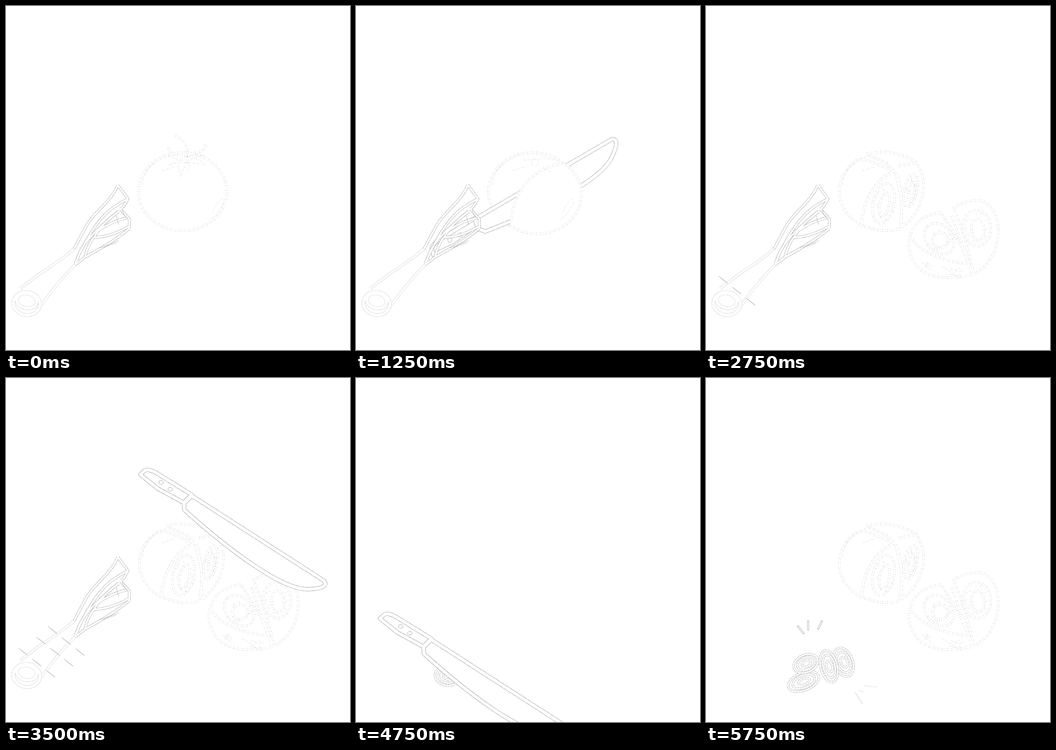
Animation of 748x748 px, one loop 6000 ms. Source, as an HTML page:

```html
<!DOCTYPE html>
<html lang="en">
<head>
<meta charset="utf-8">
<title>Slicing</title>
<style>
html, body { margin: 0; width: 100%; height: 100%; overflow: hidden; background: #fff; }
svg { display: block; width: 100vw; height: 100vh; }
path { fill: none; stroke-linejoin: round; }
.knife { stroke: #a8a8a8; stroke-dasharray: 11 .7; }
.leek { stroke: #acacac; stroke-dasharray: 4 1; }
.root { stroke: #c4c4c4; stroke-dasharray: 2 1.5; }
.tomato { stroke: #c4c4c4; stroke-dasharray: 2 3 1 4; }
.ring { stroke: #b8b8b8; stroke-dasharray: 5 1; }
.mark { stroke: #b8b8b8; stroke-linecap: round; }
.solid { fill: #fff; }
.core { stroke: #fff; }
</style>
</head>
<body>
<svg viewBox="0 0 748 748">
  <clipPath id="below"><path d="M0 480L60 515L200 600V748H0Z"/></clipPath>
  <g id="stage"></g>
</svg>
<script>
const NS = 'http://www.w3.org/2000/svg', LOOP = 6000;
const stage = document.getElementById('stage');

function add(parent, tag, attrs = {}) {
  const el = document.createElementNS(NS, tag);
  for (const k in attrs) el.setAttribute(k, attrs[k]);
  return parent.appendChild(el);
}

// White strokes of width w with thin grey edges; strokes of one call merge.
function band(g, cls, w, ...paths) {
  for (const d of paths) add(g, 'path', { d, class: cls, 'stroke-width': w + 2 });
  for (const d of paths) add(g, 'path', { d, class: 'core', 'stroke-width': w });
}

function line(g, cls, ...paths) {
  for (const d of paths) add(g, 'path', { d, class: cls, 'stroke-width': 1 });
}

function oval(x, y, rx, ry, turn = 0) {
  const a = turn * Math.PI / 180, dx = rx * Math.cos(a), dy = rx * Math.sin(a);
  const arc = `A${rx} ${ry} ${turn} 0 1 `;
  return `M${x - dx} ${y - dy}${arc}${x + dx} ${y + dy}${arc}${x - dx} ${y - dy}Z`;
}

function random(seed) {
  return () => (seed = seed * 16807 % 2147483647) / 2147483647;
}

// A layer visible only during the given [from, to) spans.
function layer(...spans) {
  const g = add(stage, 'g');
  const on = t => spans.some(([a, b]) => t >= a && t < b) ? 1 : 0;
  const times = [...new Set([0, ...spans.flat()])].filter(t => t < LOOP).sort((a, b) => a - b);
  const keys = times.map(t => ({ offset: t / LOOP, opacity: on(t), easing: 'step-end' }));
  keys.push({ offset: 1, opacity: keys[keys.length - 1].opacity });
  g.animate(keys, { duration: LOOP, iterations: Infinity });
  return g;
}

function knife(transform, ...spans) {
  const g = add(layer(...spans), 'g', { transform });
  band(g, 'knife solid', 7,
    'M260 328L270 319Q279 315 296 325L372 372L354 389L299 359Z',
    'M372 374L658 558Q668 567 655 573Q640 578 617 577C560 572 450 490 356 405L355 391Z');
  line(g, 'knife', oval(305, 345, 5, 4.5), oval(325, 360, 5, 4));
}

const tipTurn = (x, y, turn) => `translate(${x} ${y}) rotate(${turn}) translate(-667 -567)`;

const SHINE = ['M297 388Q300 345 355 324', 'M306 357L322 341', 'M341 358L366 350',
  'M470 420Q456 428 449 452', 'M473 428Q464 450 445 464'];
const BODY = oval(384, 404, 96, 85);

function calyx(g) {
  band(g, 'tomato', 3, 'M368 283Q390 292 396 320', 'M435 302Q428 320 408 318', 'M353 309L361 321');
  for (let i = 0; i < 6; i++) {
    const a = i * Math.PI / 3 + .5, x = 394 + 44 * Math.cos(a), y = 337 + 20 * Math.sin(a);
    line(g, 'tomato', `M394 327Q${x + 8} ${y - 6} ${x} ${y}Q${x - 12} ${y - 5} 394 341`);
  }
  line(g, 'tomato', 'M374 348L380 372L388 348');
}

// Seed chamber: nested outlines with short strokes between them.
function chamber(g, x, y, rx, ry, turn) {
  const rnd = random(x);
  band(g, 'tomato', 3, oval(x, y, rx, ry, turn));
  band(g, 'tomato', 3, oval(x + 2, y + 3, rx * .45, ry * .6, turn));
  for (let i = 0; i < 12; i++) {
    const a = rnd() * 2 * Math.PI, r = .6 + rnd() * .25;
    const sx = x + rx * r * Math.cos(a), sy = y + ry * r * Math.sin(a);
    line(g, 'tomato', `M${sx} ${sy}l${rnd() * 6 - 3} ${3 + rnd() * 5}`);
  }
}

function speckle(g) {
  const rnd = random(41);
  for (let i = 0; i < 16; i++) {
    const x = 470 + rnd() * 85, y = 552 + (x - 470) * .22 + rnd() * 18;
    line(g, 'tomato', `M${x} ${y}l${4 + rnd() * 12} ${2 + rnd() * 6}`);
  }
}

function halves(g) {
  band(g, 'tomato solid', 3, 'M337 478A96 85 0 0 1 452 338C500 380 475 455 426 485Q375 495 337 478Z',
    'M338 474C340 410 380 350 455 340');
  line(g, 'tomato', ...SHINE.slice(0, 3));
  chamber(g, 409, 418, 34, 62, 32);
  band(g, 'tomato solid', 3, oval(529, 509, 88, 86), 'M444 500C470 565 570 565 616 490');
  chamber(g, 532, 492, 58, 38, -8);
  speckle(g);
}

function quarters(g) {
  band(g, 'tomato solid', 3,
    'M337 476A96 85 0 0 1 330 334L348 334L410 359C365 375 340 430 337 476Z',
    'M339 476C340 430 365 375 412 359Q417 385 427 430L421 485Q380 495 339 476Z',
    'M349 322Q400 308 454 337C487 375 476 445 426 481L425 411L417 368L394 343Z',
    'M420 348L460 340');
  line(g, 'tomato', ...SHINE.slice(0, 3));
  chamber(g, 386, 429, 23, 44, 12);
  chamber(g, 445, 401, 14, 37, 12);
  band(g, 'tomato solid', 3,
    'M510 449Q443 460 441 520C446 575 490 605 579 584Q560 520 510 449Z',
    'M538 441Q565 419 600 424C650 440 650 550 582 583Q565 500 538 441Z',
    'M444 500Q470 548 566 560', 'M534 456Q555 515 579 578');
  chamber(g, 507, 506, 37, 28, 48);
  chamber(g, 589, 483, 30, 39, -5);
  speckle(g);
}

function leek(g) {
  band(g, 'root', 4, 'M148 528Q118 554 72 583L30 615', 'M150 563Q110 603 76 652');
  band(g, 'root', 6, oval(45, 647, 29, 25, 10), oval(45, 641, 22, 16, 12));
  band(g, 'leek', 4,
    'M148 528L172 483C190 448 230 425 243 389L265 419Q257 437 248 442',
    'M264 420C225 440 195 460 150 560',
    'M249 442L268 463V484Q235 512 172 546L150 563',
    'M172 544Q178 520 191 503Q225 503 266 480',
    'M191 503Q210 472 245 446', 'M154 556C158 525 190 490 245 447',
    'M200 489Q230 468 262 461');
  line(g, 'leek', 'M204 526L246 510', 'M212 525L240 515', 'M240 456L245 476', 'M253 444Q256 456 265 462');
}

function slice(g, x, y, rx, ry, turn) {
  for (const s of [.95, .68, .34])
    band(g, s > .9 ? 'ring solid' : 'ring', 3, oval(x + 2 - 2 * s, y, rx * s, ry * s, turn));
}

// Tomato, the blade passing through it, and the front half over the blade
const whole = layer([0, 1250]);
band(whole, 'tomato', 3, BODY);
line(whole, 'tomato', ...SHINE);
calyx(whole);
const back = layer([1250, 1500]);
band(back, 'tomato', 3, BODY);
line(back, 'tomato', ...SHINE, oval(389, 340, 7, 8), 'M365 335L402 334', 'M408 330L445 337');
knife(tipTurn(566, 287, -63), [1250, 1500]);
const front = layer([1250, 1500]);
band(front, 'tomato solid', 3, 'M336 478C338 410 380 350 452 342A96 85 0 0 1 336 478Z');
line(front, 'tomato', ...SHINE.slice(3), 'M412 354L424 363');
halves(layer([1500, 2000]));
quarters(layer([2000, 4000], [5250, LOOP]));

leek(layer([0, 4250]));
leek(add(layer([4250, 4500]), 'g', { 'clip-path': 'url(#below)' }));

// Guide strokes
[
  [500, 'M436 236L408 292'], [750, 'M298 573L269 629'],
  [1750, 'M572 602L587 633'], [2250, 'M323 432L294 468']
].forEach(([t, d]) => band(layer([t, t + 250]), 'mark', 1, d));

[[27, 587], [66, 563], [91, 540]].forEach(([x, y], row) => {
  const g = layer([2750 + row * 250, 4500]);
  for (let i = 0; i < 3; i++)
    line(g, 'leek', `M${x + i * 30} ${y + i * 24}l17 13l3 3l-17 -13`);
});

// Rings of leek with small rays around them
const rings = layer([5000, LOOP]);
slice(rings, 299, 618, 21, 34, -20);
slice(rings, 267, 627, 19, 37, -14);
slice(rings, 212, 660, 37, 20, -22);
slice(rings, 217, 621, 29, 20, -24);
band(rings, 'mark', 2, 'M200 540L212 555', 'M222 529V547', 'M252 529L244 545');
line(rings, 'root', 'M345 669L371 672', 'M333 679L344 683', 'M323 683L340 710', 'M325 683L341 709');
slice(layer([4750, 5000]), 198, 648, 28, 22, 10);

// Chop from above, then the long sweep down to the left and back
knife(tipTurn(471, 176, -77), [1000, 1250]);
[
  [32, -118, [1750, 2000], [3500, 3750], [5500, 5750]],
  [0, 0, [3750, 4000], [5250, 5500]],
  [-63, 113, [4000, 4250], [5000, 5250]],
  [-208, 195, [4250, 4500], [4750, 5000]],
  [-328, 270, [4500, 4750]]
].forEach(([x, y, ...spans]) => knife(`translate(${x} ${y})`, ...spans));
</script>
</body>
</html>
```
